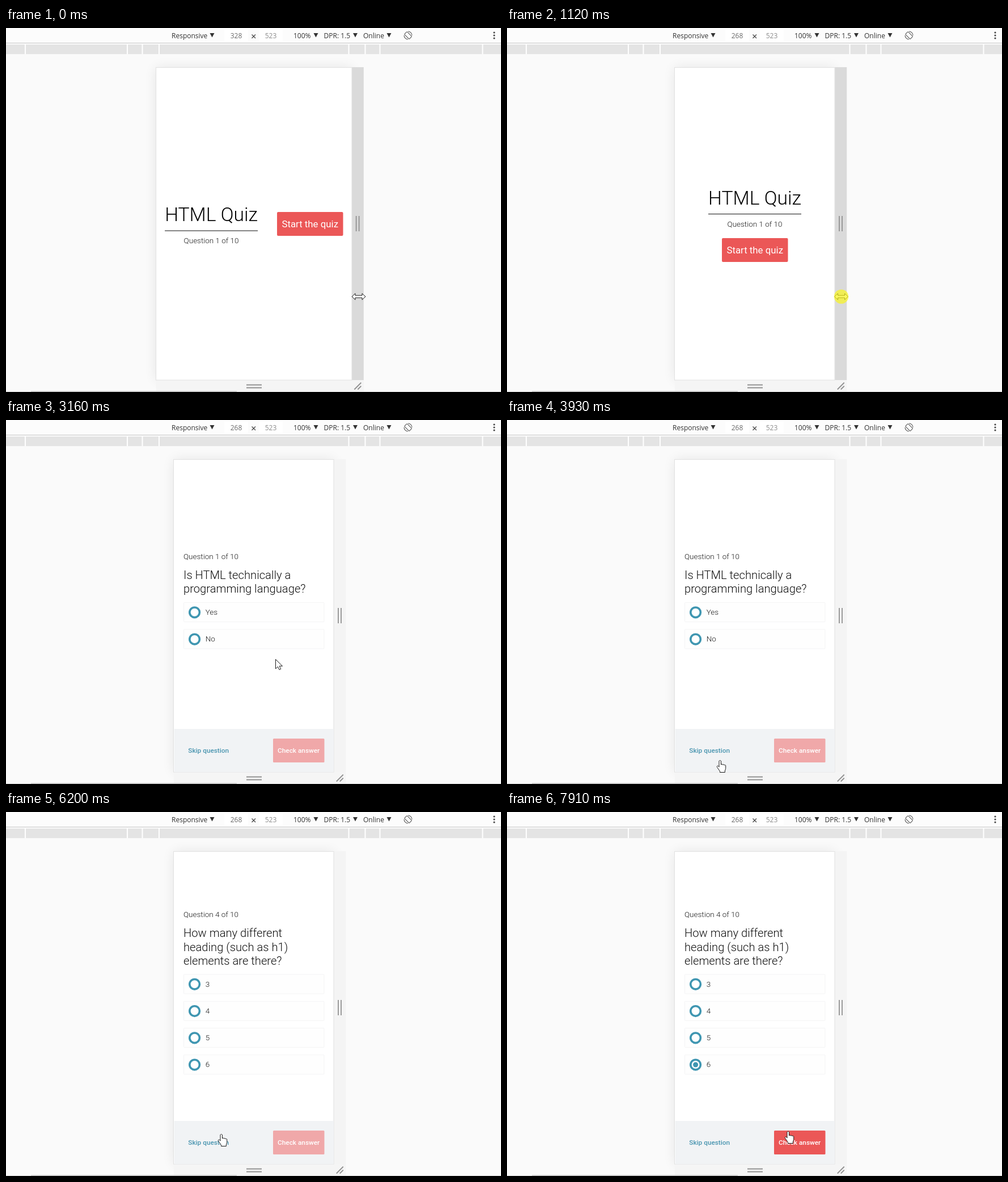
Animation of 873 by 641 pixels, one loop 8 s. Source, as an HTML page:

```html
<!DOCTYPE html>
<html lang="en">
<head>
<meta charset="utf-8">
<title>HTML Quiz</title>
<style>
  html, body { margin: 0; width: 100%; height: 100%; overflow: hidden; background: #fafafa; }
  svg { display: block; width: 873px; height: 641px; }
  text { white-space: pre; }
  .bar text { font: 12px "Open Sans", "Noto Sans", sans-serif; fill: #333; }
  .bar .size { font-size: 12px; fill: #6a6a6a; text-anchor: middle; }
  .bar .dim { fill: #8c8c8c; }
  .page text { font-family: Roboto, sans-serif; font-weight: 300; fill: #111; }
  .page .title { font-size: 33.7px; text-anchor: middle; fill: #000; }
  .page .small { font-size: 13.47px; fill: #1c1c1c; }
  .page .heading { font-size: 20.2px; }
  .page .mid { text-anchor: middle; }
  .page .start { font-size: 16.84px; font-weight: 400; fill: #fff; text-anchor: middle; }
  .page .action { font-size: 11.8px; font-weight: 500; }
  .option { fill: #fefefe; stroke: #f4f4f5; }
  .ring { fill: #fff; stroke: #3f96b1; stroke-width: 3.6; }
  .dot { fill: #3f96b1; }
  .grip { stroke: #929292; stroke-width: 1.8; fill: none; }
  .cursor path { fill: #fff; stroke: #1a1a1a; stroke-width: 1; stroke-linejoin: round; }
</style>
</head>
<body>
<svg viewBox="0 0 873 641">
  <defs>
    <filter id="blur" x="-20%" y="-20%" width="140%" height="140%"><feGaussianBlur stdDeviation="11"/></filter>
  </defs>
  <rect width="873" height="641" fill="#fafafa"/>

  <rect id="shadow" y="70" height="550" fill="#000" opacity=".085" filter="url(#blur)"/>

  <g class="bar">
    <rect width="873" height="46" fill="#fcfcfc"/>
    <rect y="26" width="873" height="1" fill="#c4c4c4"/>
    <rect y="29" width="873" height="17" fill="#e4e4e4"/>
    <g id="ticks" fill="#fff"></g>
    <path d="M385 3h42v20h-42zM446 3h42v20h-42z" fill="#fff"/>
    <text x="292" y="17.5">Responsive</text>
    <text x="507" y="17.5">100%</text>
    <text x="560.5" y="17.5">DPR: 1.5</text>
    <text x="630" y="17.5">Online</text>
    <text id="width" class="size" x="406" y="17.5"></text>
    <text class="size dim" x="467" y="17.5">523</text>
    <path d="M433.5 11.5l6.5 6.5m0-6.5l-6.5 6.5" stroke="#444" stroke-width="1.2"/>
    <path d="M359.5 9h8l-4 7.5zM542.500 9h8l-4 7.500zM612 9h8l-4 7.500zM671.500 9h8l-4 7.500z" fill="#333"/>
    <g fill="none" stroke="#5a5a5a" stroke-width="1.1">
      <rect x="705.8" y="7" width="6.600" height="12" rx="1" transform="rotate(-45 709.100 13)"/>
      <path d="M709 6a7 7 0 0 1 7 7M709 20a7 7 0 0 1-7-7"/>
    </g>
    <g fill="#444"><circle cx="861" cy="8" r="1.600"/><circle cx="861" cy="13" r="1.600"/><circle cx="861" cy="18" r="1.600"/></g>
  </g>

  <rect id="foot" y="620" height="20" fill="#f5f5f5"/>
  <rect id="gutter" y="69" width="21" height="551"/>
  <path class="grip" d="M424 628.500h27M424 633.500h27"/>
  <path id="side" class="grip" d="M-2.500-13.500v27M2.500-13.500v27"/>
  <path id="corner" class="grip" d="M-6 6L6-6M0 6L6 0"/>
  <rect y="640" width="873" height="1" fill="#d6d6d6"/>
  <rect x="44" y="639.500" width="363" height="1.500" fill="#b9b9b9"/>

  <rect id="screen" y="69.500" height="550.500" fill="#fff" stroke="#e1e1e1"/>
  <g id="page" class="page"></g>
  <g id="cursor" class="cursor"><path/></g>
  <circle id="spot" r="12.600" fill="#faf51e" fill-opacity=".7"/>
</svg>
<script>
const LOOP = 8000, SCALE = 1.0526, MID = 437.2;
const RED = '#eb5757', PALE = '#f0a8a9';
const $ = id => document.getElementById(id);
const set = (id, attrs) => { for (const k in attrs) $(id).setAttribute(k, attrs[k]); };

$('ticks').innerHTML = [33, 213, 239.5, 269, 603.5, 632.5, 658.5, 839.5]
  .map(x => `<rect x="${x}" y="29" width="2" height="17"/>`).join('');

const cursors = {
  resize: 'M-12 0l6-5.500v3.500h12v-3.500l6 5.500l-6 5.500v-3.500h-12v3.500z',
  arrow: 'M.5 .5v16.500l3.900-3.600l2.600 5.400l2.700-1.200l-2.500-5.300h5.300z',
  hand: 'M-2 2c0-2 3.500-2 3.500 0v6c.3-1.400 2.800-1.200 2.900.3c.6-1.200 2.700-.8 2.800.6c.7-.9 2.500-.6 2.500 1v4.500c0 2-1.200 3-1.400 4.600v2.500h-8.800v-2c-1.500-2.500-3.500-4.500-5-7.200c-1-2 1.400-3 2.500-1.500l1 1.300z'
};

// Screen width while dragging, one step per 90 then 82 ms
const widths = [328, 325, 319, 311, 302, 292, 283, 276, 271, 268];
function widthAt(t) {
  if (t < 340) return 328;
  const i = t < 790 ? (t - 340) / 90 : 5 + (t - 790) / 82.5;
  return widths[Math.min(9, Math.floor(i))];
}

const spots = [[340, 1660], [2530, 2680], [4250, 4410], [4880, 5030], [5600, 5650], [7040, 7210]];

// Pointer travel: start, end, number of steps, first and last position
const moves = [
  { t0: 1910, t1: 2220, n: 5, from: [568, 458], to: [480, 404], ease: p => 1 - (1 - p) ** 1.9 },
  { t0: 3160, t1: 3930, n: 11, from: [475, 421], to: [376, 599] },
  { t0: 6200, t1: 6760, n: 8, from: [380, 567], to: [422, 455] },
  { t0: 7590, t1: 7910, n: 5, from: [431, 470], to: [496, 562] }
];
const smooth = p => p * p * (3 - 2 * p);

function pointer(t, right) {
  const m = moves.filter(m => t >= m.t0).pop();
  if (!m) return [t < 100 ? 622 : right + 11.3, 473];
  const last = m.n - 1;
  const k = Math.min(last, Math.floor((t - m.t0) / (m.t1 - m.t0) * last + .02));
  const p = (m.ease || smooth)(k / last);
  return m.from.map((a, i) => a + (m.to[i] - a) * p);
}

const text = (cls, x, y, s, extra = '') => `<text class="${cls}" x="${x}" y="${y}" ${extra}>${s}</text>`;
const more = 'information for search engines|and more.';
const questions = [
  { at: 2680, top: 321.3, head: 'Is HTML technically a|programming language?', options: ['Yes', 'No'] },
  { at: 4410, top: 209.3, head: 'The head element may|contain:', options: [
    'The website title, images,|' + more, 'The website title, images,|' + more,
    'Paragraphs, CSS styles,|' + more, 'The website title, CSS styles,|' + more] },
  { at: 5030, top: 273.7, head: 'Which element is used|to create a hyperlink?', options: ['link', 'a', 'href', 'url'] },
  { at: 5650, top: 285.8, head: 'How many different|heading (such as h1)|elements are there?', options: ['3', '4', '5', '6'] }
];

function intro(w, left, right, hover) {
  const wide = w >= 312;
  const cx = wide ? left + 97.5 : 437, y = wide ? 357 : 327.5;
  const bx = wide ? right - 131.8 : 379, by = wide ? 324 : 370;
  return text('title', cx, y - 17, 'HTML Quiz') +
    `<rect x="${cx - 82}" y="${y - .5}" width="164" height="1.1" fill="#222"/>` +
    text('small mid', cx, y + 22, 'Question 1 of 10') +
    `<rect x="${bx}" y="${by}" width="116.500" height="42" rx="2" fill="${hover ? '#e84545' : RED}"/>` +
    text('start', bx + 58.2, by + 26.7, 'Start the quiz');
}

function option(label, y, dot) {
  const lines = label.split('|');
  return `<rect class="option" x="313.500" y="${y + .2}" width="247.500" height="${34 + 16.17 * (lines.length - 1)}" rx="1"/>` +
    `<circle class="ring" cx="332.600" cy="${y + 17.5}" r="8.800"/>` +
    (dot ? `<circle class="dot" cx="332.600" cy="${y + 17.5}" r="4.500" opacity="${dot}"/>` : '') +
    lines.map((s, i) => text('small', 351.7, y + 21.9 + 16.17 * i, s)).join('');
}

function quiz(index, checked, hover) {
  const q = questions[index], lines = q.head.split('|');
  const first = q.top - 17 - 24.2 * (lines.length - 1);
  const pitch = 47.25 + 16.17 * (q.options[0].split('|').length - 1);
  return text('small', 313, first - 35, `Question ${index + 1} of 10`) +
    lines.map((s, i) => text('heading', 313, first + 24.2 * i, s)).join('') +
    q.options.map((s, i) => option(s, q.top + pitch * i, i === 3 && (checked ? 1 : hover ? .3 : 0))).join('') +
    '<rect x="296.700" y="544" width="281" height="76" fill="#f1f3f5"/>' +
    text('action', 321.3, 586, 'Skip question', 'style="fill:#4a95b0"') +
    `<rect x="471" y="561" width="90.500" height="42" rx="1.500" fill="${checked ? RED : PALE}"/>` +
    text('action mid', 516.2, 586.2, 'Check answer', 'style="fill:#fff"');
}

function kindOf(t, x, y) {
  if (t < 1910) return 'resize';
  if (t < 2680) return x < 495 && y < 411 ? 'hand' : 'arrow';
  if (y > 560) return x < 401 || x > 470 ? 'hand' : 'arrow';
  return t > 5650 && y < 463 ? 'hand' : 'arrow';
}

let shown = '';
function draw(t) {
  const w = widthAt(t), left = MID - w * SCALE / 2, right = MID + w * SCALE / 2;
  const [x, y] = pointer(t, right), kind = kindOf(t, x, y);

  $('width').textContent = w;
  set('shadow', { x: left, width: right - left });
  set('screen', { x: Math.round(left) - .5, width: Math.round(right) - Math.round(left) + .5 });
  set('foot', { x: left, width: right - left + 21 });
  set('gutter', { x: right, fill: t < 1910 ? '#dadada' : '#f4f4f4' });
  set('side', { transform: `translate(${right + 10.3} 344.500)` });
  set('corner', { transform: `translate(${right + 10.5} 630.500)` });

  const index = questions.filter(q => t >= q.at).length - 1;
  const page = index < 0
    ? intro(w, left, right, kind === 'hand')
    : quiz(index, t >= 7210, t > 5650 && kind === 'hand' && y < 463);
  if (page !== shown) $('page').innerHTML = shown = page;

  $('cursor').firstElementChild.setAttribute('d', cursors[kind]);
  set('cursor', { transform: `translate(${x} ${y})` });
  const lit = spots.some(([a, b]) => t >= a && t < b);
  set('spot', { cx: x, cy: y, visibility: lit ? 'visible' : 'hidden' });
}

const began = performance.now();
function tick() {
  draw((performance.now() - began) % LOOP);
  requestAnimationFrame(tick);
}
tick();
</script>
</body>
</html>
```
